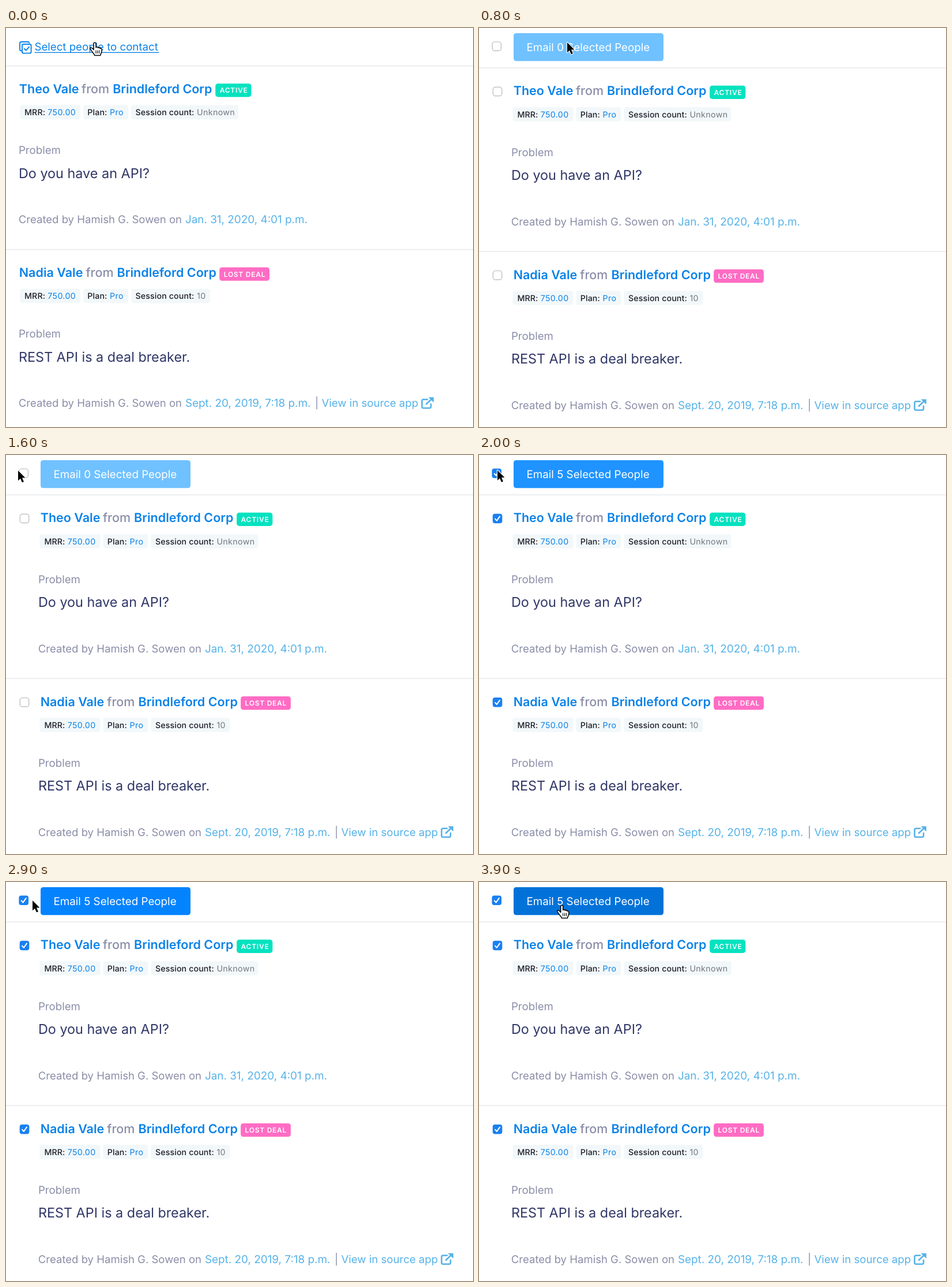
An HTML page for the animation above (4 s loop, 810 by 691 pixels).

```html
<!DOCTYPE html>
<html lang="en">
<head>
<meta charset="utf-8">
<title>Select people to contact</title>
<style>
  html, body { margin: 0; width: 100%; height: 100%; overflow: hidden; background: #fff; }
  svg { display: block; width: 100vw; height: 100vh; }
  text {
    font-family: Inter, "Noto Sans", sans-serif;
    font-optical-sizing: none;
    text-rendering: geometricPrecision;
    white-space: pre;
  }
</style>
</head>
<body>
<svg id="stage" viewBox="0 0 810 691"></svg>
<script>
const LOOP = 4000, STEP = 100, PITCH = 318.3;
const BLUE = '#0a82e8', SKY = '#56b2e8', GRAY = '#8b8da8', INK = '#303767', DARK = '#1d1d28';

const label = (s, x, y, size, fill, weight = 400, spacing = 0, id = '') =>
  `<text ${id && `id="${id}"`} x="${x}" y="${y}" font-size="${size}" fill="${fill}" font-weight="${weight}" letter-spacing="${spacing}">${s}</text>`;
const box = (x, y, w, h, fill, r = 4, extra = '') =>
  `<rect x="${x}" y="${y}" width="${w}" height="${h}" rx="${r}" fill="${fill}" ${extra}/>`;
const line = (d, stroke, width) =>
  `<path d="${d}" fill="none" stroke="${stroke}" stroke-width="${width}" stroke-linecap="round" stroke-linejoin="round"/>`;
const shift = (x, y, s) => `<g transform="translate(${x} ${y})">${s}</g>`;
const divider = y => box(0, y - 0.7, 810, 1.4, '#e4e7ea', 0);

const people = [
  { name: 'Theo Vale', fromX: 131, corpX: 185.2, tag: 'ACTIVE', tagX: 363.2, tagW: 62.2, tagColor: '#04e2bf',
    count: 'Unknown', countW: 186, title: 'Do you have an API?', date: 'Jan. 31, 2020, 4:01 p.m.' },
  { name: 'Nadia Vale', fromX: 138.4, corpX: 192.6, tag: 'LOST DEAL', tagX: 370.2, tagW: 86.8, tagColor: '#ff6cc4',
    count: '10', countW: 137, title: 'REST API is a deal breaker.', date: 'Sept. 20, 2019, 7:18 p.m.', link: true }
];

function heading(p) {
  return label(p.name, 22.8, 112.8, 21.5, BLUE, 600) +
    label('from', p.fromX, 112.8, 21.5, GRAY, 500) +
    label('Brindleford Corp', p.corpX, 112.8, 21.5, BLUE, 600) +
    box(p.tagX, 96.2, p.tagW, 23.2, p.tagColor, 4.5) +
    label(p.tag, p.tagX + 7.5, 112.4, 12, '#fff', 600, 0.75);
}

function chips(p) {
  const key = (s, x) => label(s, x, 151.1, 14.2, DARK, 500, 0.13);
  const value = (s, x, fill) => label(s, x, 151.1, 14.25, fill, 400, 0.35);
  return [[24, 105], [134, 78], [217, p.countW]].map(([x, w]) => box(x, 133.5, w, 24.5, '#f2f8fa')).join('') +
    key('MRR:', 32) + value('750.00', 72.3, BLUE) +
    key('Plan:', 141.3) + value('Pro', 180.1, BLUE) +
    key('Session count:', 224.5) + value(p.count, 331, '#737780');
}

function details(p) {
  const out = label('Problem', 21.9, 218, 18.7, GRAY) +
    label(p.title, 21.9, 259.5, 23.4, INK) +
    label('Created by Hamish G. Sowen on', 21.8, 338, 18.55, GRAY) +
    label(p.date, 310.9, 338, 18.9, SKY);
  if (!p.link) return out;
  return out + label('|', 536, 338, 18.6, GRAY) + label('View in source app', 547.5, 338, 18.6, SKY) +
    line('M731 325H724Q721.5 325 721.5 327.5V337.5Q721.5 340 724 340H734.5Q737 340 737 337.5V333M729 333L738.5 324', SKY, 2.6) +
    `<path d="M733.5 321.6H741.3V329.4Z" fill="${SKY}" stroke="${SKY}" stroke-linejoin="round"/>`;
}

const list = (headX, chipX, textX, dy) => people.map((p, i) => shift(0, dy + i * PITCH,
  shift(headX, 0, heading(p)) + shift(chipX, 0, chips(p)) + shift(textX, 0, details(p)))).join('');

const checkSpots = [[30.7, 31.7], [32, 110], [32, 428.2]];
const emptyBox = ([x, y]) => box(x - 7.7, y - 7.7, 15.4, 15.4, '#fff', 4, 'stroke="#b8b8ba" stroke-width="1.2"');
const tickedBox = ([x, y]) => box(x - 8.3, y - 8.3, 16.6, 16.6, '#1a80f2') +
  line(`M${x - 3.9} ${y + 0.6}l2.8 3.2 5.1-7.4`, '#fff', 2);

const linkView =
  line('M26.5 39.5Q24 39.5 24 37V26.5Q24 24 26.5 24H38Q40 24 40.3 25.5', BLUE, 1.9) +
  box(28, 28, 15.6, 15.6, 'none', 2.4, `stroke="${BLUE}" stroke-width="1.9"`) +
  line('M31.8 36l2.9 2.9 5.2-6.1', BLUE, 2) +
  label('Select people to contact', 49.5, 39, 18.65, BLUE) +
  box(49.5, 41.7, 216, 1.4, BLUE, 0) +
  divider(65.6) + divider(383.6) + list(0, 0, 0, 0);

const pickView =
  box(60, 9, 260, 48.3, BLUE, 4.5, 'id="button"') +
  label('', 82.5, 40.4, 18.8, '#fff', 400, 0, 'caption') +
  divider(69) + divider(387) + list(36.9, 34.4, 34, 3.5) +
  `<g id="empty">${checkSpots.map(emptyBox).join('')}</g>` +
  `<g id="ticked">${checkSpots.map(tickedBox).join('')}</g>`;

const arrow = '<path d="M0 0V17.4L4 13.7 6.9 20.6 9.9 19.3 7 12.5H12.4Z" fill="#000" stroke="#fff" stroke-width="2.2" paint-order="stroke" stroke-linejoin="round"/>';
const hand = shift(0, -0.8,
  '<path d="M-2 12.5V2A2 2 0 0 1 2 2V8.6C2.6 7 5.4 7.3 5.6 9.2 6.4 7.8 8.8 8.3 9 10.2 10 9.2 12 9.9 12 11.8V15C12 18 10 19.2 9.8 22.3H-.2C-.8 19.8-3.4 18-5.2 14.8-6.5 12.5-8.7 11.2-8 9.6-7 8-4.2 9.2-2 12.5Z" fill="#fff" stroke="#000" stroke-width="1.5" stroke-linejoin="round"/>' +
  line('M2 13.8V18.6M4.9 13.8V18.6M7.8 13.8V18.6', '#000', 1.1));

const stage = document.getElementById('stage');
stage.innerHTML = `<g id="link">${linkView}</g><g id="pick">${pickView}</g>` +
  `<g id="pointer"><g id="arrow">${arrow}</g><g id="hand">${hand}</g></g>`;
const $ = id => document.getElementById(id);
const show = (id, on) => $(id).setAttribute('display', on ? 'inline' : 'none');

// Pointer path: time, x, y
const path = [
  [0, 154, 26], [500, 154, 26], [600, 153, 25], [1200, 153, 25], [1300, 136, 25], [1500, 34, 26],
  [1600, 21, 27], [1800, 32, 26.5], [2800, 32, 26.5], [2900, 46, 32], [3000, 96, 48],
  [3100, 128, 52], [3200, 136, 46.5], [3400, 143.7, 41], [LOOP, 143.7, 41]
];

function pointerAt(t) {
  const i = path.findIndex(k => k[0] > t);
  const [t0, x0, y0] = path[i - 1], [t1, x1, y1] = path[i];
  const f = (t - t0) / (t1 - t0);
  return [x0 + (x1 - x0) * f, y0 + (y1 - y0) * f];
}

const PALE = [112, 193, 255], FULL = [4, 131, 255], HOVER = [2, 114, 217];
const ramp = (t, start, length) => Math.min(1, Math.max(0, (t - start) / length));
const mix = (a, b, f) => a.map((v, i) => v + (b[i] - v) * f);

function draw(t) {
  const picking = t >= 800, ticked = t >= 1900;
  show('link', !picking);
  show('pick', picking);
  show('empty', !ticked);
  show('ticked', ticked);
  $('caption').textContent = `Email ${ticked ? 5 : 0} Selected People`;
  const color = mix(mix(PALE, FULL, ramp(t, 1850, 200)), HOVER, ramp(t, 2950, 150));
  $('button').setAttribute('fill', `rgb(${color.map(Math.round)})`);

  const [x, y] = pointerAt(t), pointing = t < 600 || t >= 3000;
  show('hand', pointing);
  show('arrow', !pointing);
  $('pointer').setAttribute('transform', `translate(${x} ${y})`);
}

const start = performance.now();
function tick() {
  const t = (performance.now() - start) % LOOP;
  draw(Math.floor(t / STEP) * STEP);
  requestAnimationFrame(tick);
}
tick();
</script>
</body>
</html>
```
